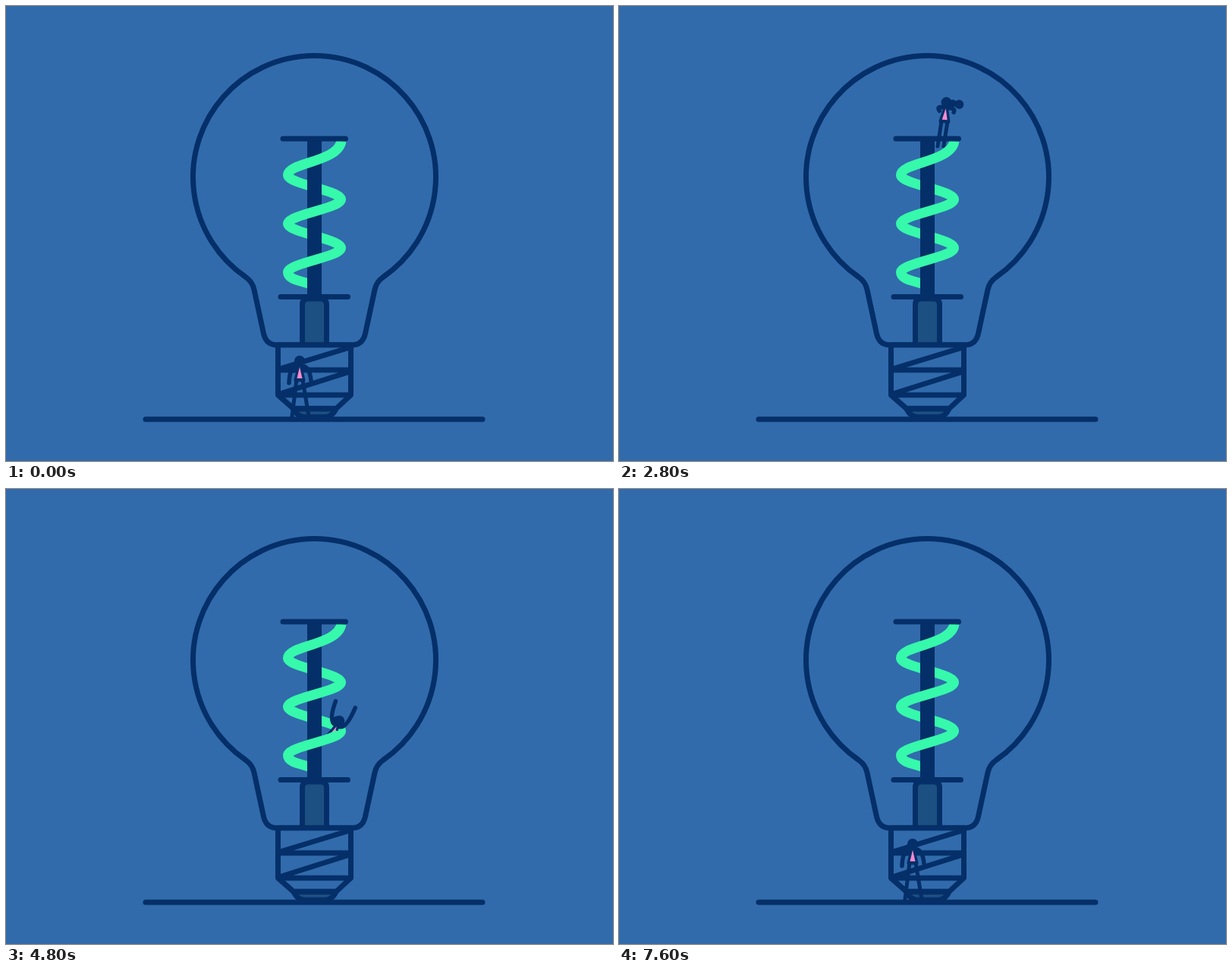
An HTML page with a canvas that plays this animation: 800 px wide and 600 px high, repeating every 7680 ms.

```html
<!DOCTYPE html>
<html lang="en">
<head>
<meta charset="utf-8">
<title>Light bulb climber</title>
<style>
  html, body { margin: 0; width: 100%; height: 100%; overflow: hidden; background: #316bac; }
  canvas { display: block; }
</style>
</head>
<body>
<canvas id="stage" width="800" height="600"></canvas>
<script>
const ctx = document.getElementById('stage').getContext('2d');
const BLUE = '#316bac', NAVY = '#052f68', TEAL = '#1c4f82', GREEN = '#36f9ab', PINK = '#f98bd0';
const LOOP = 7680, STEP = 80;

const shapes = {
  bulb: 'M316 357.5A160 160 0 1 1 497 357.5Q488 364 486 374L473.5 432Q470 447 456 447H357Q343 447 339.5 432L327 374Q325 364 316 357.5Z',
  stem: 'M390.5 447V394Q390.5 386 398.5 386H414.5Q422.5 386 422.5 394V447',
  base: 'M358.5 447H454.5V513L435 531H379L358.5 513Z',
  tip: 'M379 531H435Q430 542 420 542H394Q384 542 379 531Z',
  thread: 'M359 479L454 450M359 480H454M359 512L454 482M359 513H454',
  plates: 'M365 175H447.5M362 383.5H450.5',
  ground: 'M184 545H628',
  coilStart: 'M442 178C438 206 371.5 206 371.5 223'
};
for (const name in shapes) shapes[name] = new Path2D(shapes[name]);

// Half turn of the coil between the right and left side.
function halfTurn(fromX, y) {
  const toX = 813 - fromX;
  return new Path2D(`M${fromX} ${y}C${fromX} ${y + 11.7} ${toX} ${y + 20.3} ${toX} ${y + 32}`);
}
const frontCoil = [shapes.coilStart, halfTurn(441.5, 255), halfTurn(441.5, 319)];
const backCoil = [halfTurn(371.5, 223), halfTurn(371.5, 287),
  new Path2D('M371.5 351C371.5 360 386 362 399 366')];

function stroke(path, color = NAVY, width = 7, cap = 'round') {
  ctx.strokeStyle = color;
  ctx.lineWidth = width;
  ctx.lineCap = cap;
  ctx.stroke(path);
}
function fill(path, color) {
  ctx.fillStyle = color;
  ctx.fill(path);
}
function disc(x, y, r) {
  ctx.beginPath();
  ctx.arc(x, y, r, 0, 7);
  ctx.fill();
}

// Pose: lean, left hand, right hand, left foot, right foot, hair; all relative to the hip.
const WIDE = [0, -14, 4, 15, 1, -10, 48, 12, 48, -9, -15];
const STAND = [0, -14, 4, 15, 4, -2, 48, 2, 48, -11, -13];
const CROUCH = [.1, -17, -2, 17, -4, -13, 43, 14, 43, -9, -14];
const REACH = [.2, -18, -24, 20, -36, -24, 48, 16, 38, -10, -16];
const CLIMB = [0, -18, -40, 18, -42, -32, 42, 32, 42, -9, -14];
const STEP_OFF = [.1, -8, -13, 11, -13, -9, 33, -1, 33, 17, -24];

const mix = (a, b, k) => a.map((v, i) => v + (b[i] - v) * k);
const smooth = k => k * k * (3 - 2 * k);

function track(t, keys) {
  let i = 1;
  while (i < keys.length - 1 && t > keys[i][0]) i++;
  const [t0, a] = keys[i - 1], [t1, b] = keys[i];
  return mix(a, b, smooth(Math.min(1, Math.max(0, (t - t0) / (t1 - t0)))));
}

const RAD = Math.PI / 180;
function coilAngle(t) {
  const phase = 32 + (t - 4800) * .45;
  return phase + 20 * Math.sin((phase + 50) * RAD);
}
const coilPoint = a => [406.5 + 35 * Math.cos(a * RAD), 319 + 32 * a / 180];

function slidePose(t) {
  const a = coilAngle(t), [x, y] = coilPoint(a);
  const [ax, ay] = coilPoint(a + 35), [bx, by] = coilPoint(a + 50);
  return [x, y, .75 * Math.cos(a * RAD), -16, -46, 11, -50,
    ax - x, ay - y, bx - x, by - y, -3, -24];
}

function walkPose(t) {
  const k = (t - 6320) / 1280, p = Math.PI / 2 + k * 4 * Math.PI;
  const s = Math.sin(p), c = Math.cos(p);
  const facing = smooth(Math.min(1, Math.max(0, (t - 6880) / 160)));
  return [387 - 51 * Math.sin(Math.PI * k), 493 - 2 * c * c, 0,
    -14, 3 + s, 15, 2 - s,
    1 - 11 * s, 48 - 4 * Math.max(0, c), 1 + 11 * s, 48 - 4 * Math.max(0, -c),
    9 - 18 * facing, -15];
}

const startKeys = [
  [0, [387, 493, ...WIDE]], [240, [398, 498, ...CROUCH]], [480, [417, 484, ...REACH]],
  [640, [410, 472, ...CLIMB]], [800, [396, 462, ...CLIMB]]
];
const topKeys = [
  [1120, [405.5, 196, ...STAND]], [1440, [405.5, 138, ...STAND]], [1520, [405.5, 140, ...STAND]],
  [1760, [406, 140, -.06, ...STAND.slice(1)]], [2000, [406, 140, .05, ...STAND.slice(1)]],
  [2400, [417, 139, ...STAND]], [2800, [429, 152, ...STEP_OFF]], [3280, slidePose(3280)]
];

function person([x, y, lean, lhx, lhy, rhx, rhy, lfx, lfy, rfx, rfy, hx, hy]) {
  const limbs = new Path2D(`M-4 0L${lfx} ${lfy}M4 0L${rfx} ${rfy}`);
  const arms = new Path2D(`M-3 -18Q-13 -19 ${lhx} ${lhy}M3 -18Q13 -19 ${rhx} ${rhy}`);
  const dress = new Path2D('M0 -20L-5 0H5Z');
  ctx.save();
  ctx.translate(x, y);
  stroke(limbs, NAVY, 5);
  ctx.rotate(lean);
  stroke(arms, NAVY, 5.5);
  ctx.lineJoin = 'round';
  stroke(dress, NAVY, 5);
  fill(new Path2D('M0 -17L-3.5 -2H3.5Z'), PINK);
  ctx.fillStyle = NAVY;
  disc(0, -25, 7);
  disc(hx / 2, (hy - 25) / 2, 5);
  disc(hx, hy, 6);
  ctx.restore();
}

function clipped(top, bottom, pose) {
  ctx.save();
  ctx.beginPath();
  ctx.rect(0, top, 800, bottom - top);
  ctx.clip();
  person(pose);
  ctx.restore();
}

function draw(t) {
  const sliding = t >= 3280 && t < 5360;
  const behindPole = sliding && Math.sin(coilAngle(t) * RAD) < 0;
  ctx.lineJoin = 'round';
  ctx.fillStyle = BLUE;
  ctx.fillRect(0, 0, 800, 600);

  if (behindPole) person(slidePose(t));
  backCoil.forEach(p => stroke(p, GREEN, 13, 'butt'));
  ctx.fillStyle = NAVY;
  ctx.fillRect(397, 175, 19, 208);
  if (t >= 1200 && t < 3280) clipped(0, t < 2000 ? 173 : 600, track(t, topKeys));
  if (sliding && !behindPole) person(slidePose(t));
  frontCoil.forEach(p => stroke(p, GREEN, 13, 'butt'));

  fill(shapes.stem, TEAL);
  stroke(shapes.stem);
  stroke(shapes.plates);
  stroke(shapes.bulb);

  if (t >= 6320 && t < 6960) person(walkPose(t));
  fill(shapes.base, BLUE);
  fill(shapes.tip, TEAL);
  stroke(shapes.thread, NAVY, 7, 'butt');
  stroke(shapes.base);
  stroke(shapes.tip);
  if (t < 880) clipped(451, 600, track(t, startKeys));
  if (t >= 6960) person(walkPose(Math.min(t, 7600)));
  stroke(shapes.ground);
}

function frame(now) {
  draw(Math.floor(now % LOOP / STEP) * STEP);
  requestAnimationFrame(frame);
}
frame(performance.now());
</script>
</body>
</html>
```
